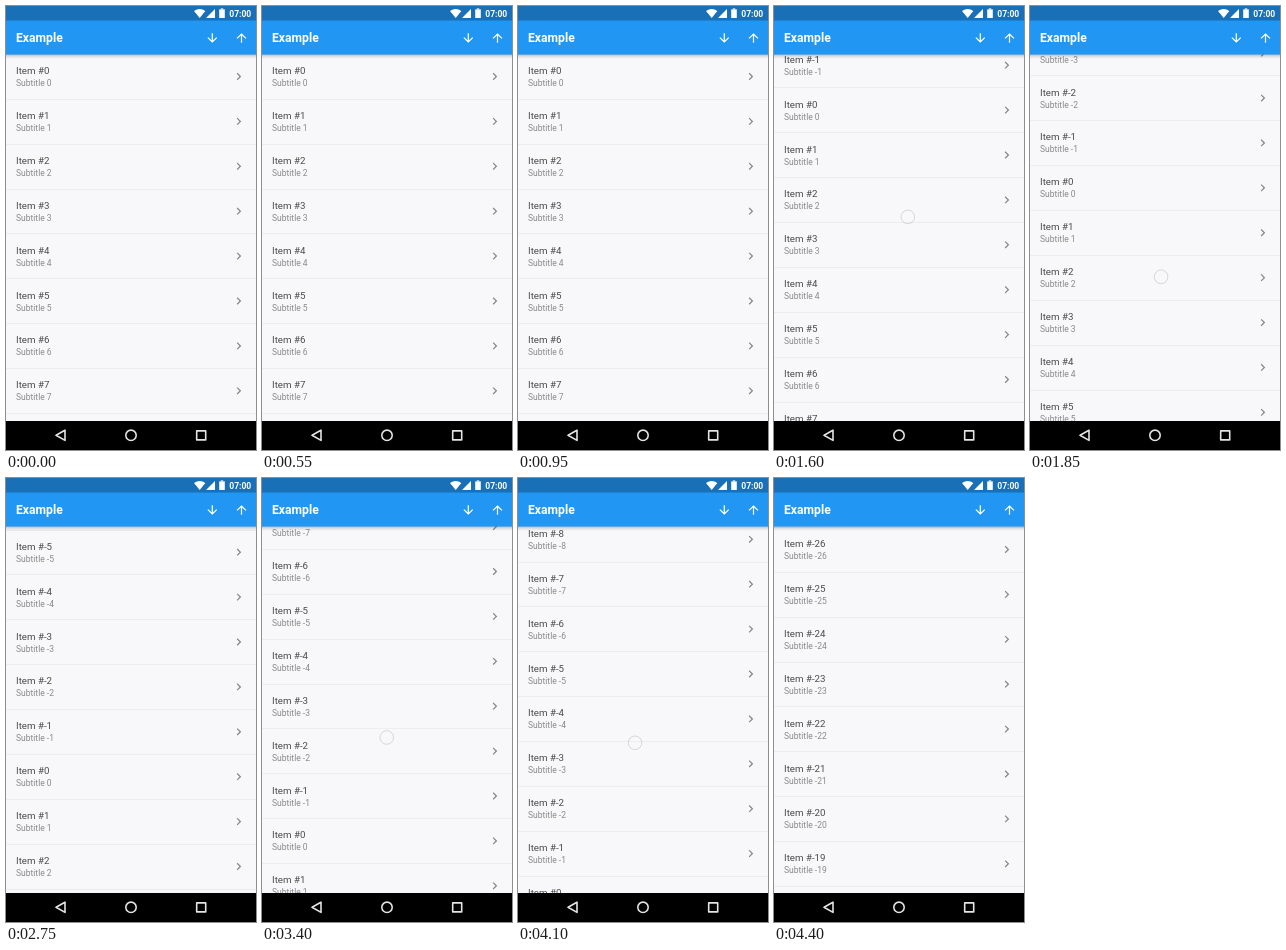
An HTML page with a canvas for the animation above (4.45 s loop, 250 by 444 pixels).

```html
<!DOCTYPE html>
<html lang="en">
<head>
<meta charset="utf-8">
<title>Endless list</title>
<style>
html, body { margin: 0; width: 100%; height: 100%; overflow: hidden; background: #000; }
canvas { display: block; }
</style>
</head>
<body>
<canvas id="stage" width="250" height="444"></canvas>
<script>
const ctx = document.getElementById('stage').getContext('2d');
const LOOP = 4450, STEP = 50, PITCH = 44.9;
const FONT = 'Roboto, "Noto Sans", sans-serif';

// Pulls on the list: when, how long, how far, and where the finger lands
const PULLS = [
  { start: 1358, span: 1000, dist: 228.2, x: 135, y: 185 },
  { start: 3180, span: 390, dist: 107.8, x: 127, y: 210 },
  { start: 4075, span: 325, dist: 832.4, x: 117.5, y: 254 }
];

const ICONS = {
  down: new Path2D('M20 12l-1.41-1.41L13 16.17V4h-2v12.17l-5.58-5.59L4 12l8 8z'),
  up: new Path2D('M4 12l1.41 1.41L11 7.83V20h2V7.83l5.58 5.59L20 12l-8-8z'),
  next: new Path2D('M10 6L8.59 7.41 13.17 12l-4.58 4.59L10 18l6-6z')
};

function moved(pull, t) {
  const u = Math.min(1, Math.max(0, (t - pull.start) / pull.span));
  return pull.dist * u * u * (3 - 2 * u);
}

function rect(color, x, y, w, h) {
  ctx.fillStyle = color;
  ctx.fillRect(x, y, w, h);
}

function text(str, x, y, size, color, weight = 400) {
  ctx.font = `${weight} ${size}px ${FONT}`;
  ctx.fillStyle = color;
  ctx.fillText(str, x, y);
}

function icon(name, cx, cy, color) {
  const k = 14.6 / 24;
  ctx.save();
  ctx.translate(cx, cy);
  ctx.scale(k, k);
  ctx.translate(-12, -12);
  ctx.fillStyle = color;
  ctx.fill(ICONS[name]);
  ctx.restore();
}

function shape(...points) {
  ctx.beginPath();
  points.forEach(p => ctx.lineTo(...p));
  ctx.closePath();
}

function circle(x, y, r) {
  ctx.beginPath();
  ctx.arc(x, y, r, 0, 2 * Math.PI);
  ctx.stroke();
}

function drawList(scroll) {
  rect('#f8f8fb', 0, 48, 250, 367);
  const first = Math.floor(-scroll / PITCH) - 1;
  for (let n = first; n < first + 12; n++) {
    const y = 64.5 + n * PITCH + scroll;
    text('Item #' + n, 10, y + 3.5, 9.73, '#4a4a4c');
    text('Subtitle ' + n, 10, y + 15.5, 8.51, '#89898c');
    icon('next', 232.8, y + 6, '#858588');
    rect('#ededf0', 0, Math.round(y + 28.2), 250, 1);
  }
}

function drawTouch(t) {
  ctx.strokeStyle = 'rgba(0,0,0,.17)';
  ctx.lineWidth = 0.8;
  for (const pull of PULLS) {
    const d = moved(pull, t);
    if (d > 0 && d < Math.min(210, pull.dist)) circle(pull.x - 0.035 * d, pull.y + 0.77 * d, 6.8);
  }
}

function drawBars() {
  const shade = ctx.createLinearGradient(0, 48, 0, 53);
  shade.addColorStop(0, 'rgba(0,0,0,.3)');
  shade.addColorStop(0.4, 'rgba(0,0,0,.12)');
  shade.addColorStop(1, 'rgba(0,0,0,0)');
  rect(shade, 0, 48, 250, 5);
  rect('#2196f3', 0, 14, 250, 34.5);
  rect('#1970b6', 0, 0, 250, 14.5);
  text('Example', 10, 36, 12.16, '#fff', 700);
  icon('down', 206.3, 32, '#fff');
  icon('up', 235.5, 32, '#fff');

  // Status icons: wifi, signal, battery, clock
  ctx.fillStyle = '#fff';
  ctx.beginPath();
  ctx.moveTo(193.7, 12);
  ctx.lineTo(188, 5);
  ctx.quadraticCurveTo(193.7, 0.8, 199.4, 5);
  ctx.fill();
  shape([200, 12], [209, 12], [209, 3]);
  ctx.fill();
  ctx.fillRect(213.2, 3.4, 5.6, 8.6);
  ctx.fillRect(214.8, 2.4, 2.4, 1);
  text('07:00', 223.3, 10.8, 8.51, '#fff', 700);

  // Navigation buttons
  rect('#000', 0, 415, 250, 29);
  ctx.strokeStyle = '#e4e4e4';
  ctx.lineWidth = 1.6;
  ctx.lineJoin = 'round';
  shape([50, 429.3], [59, 424.2], [59, 434.4]);
  ctx.stroke();
  circle(125, 429.3, 5.2);
  ctx.strokeRect(190.7, 424.9, 9, 9);
}

function draw() {
  const t = Math.floor(performance.now() % LOOP / STEP) * STEP;
  drawList(PULLS.reduce((sum, pull) => sum + moved(pull, t), 0));
  drawTouch(t);
  drawBars();
  requestAnimationFrame(draw);
}
draw();
</script>
</body>
</html>
```
